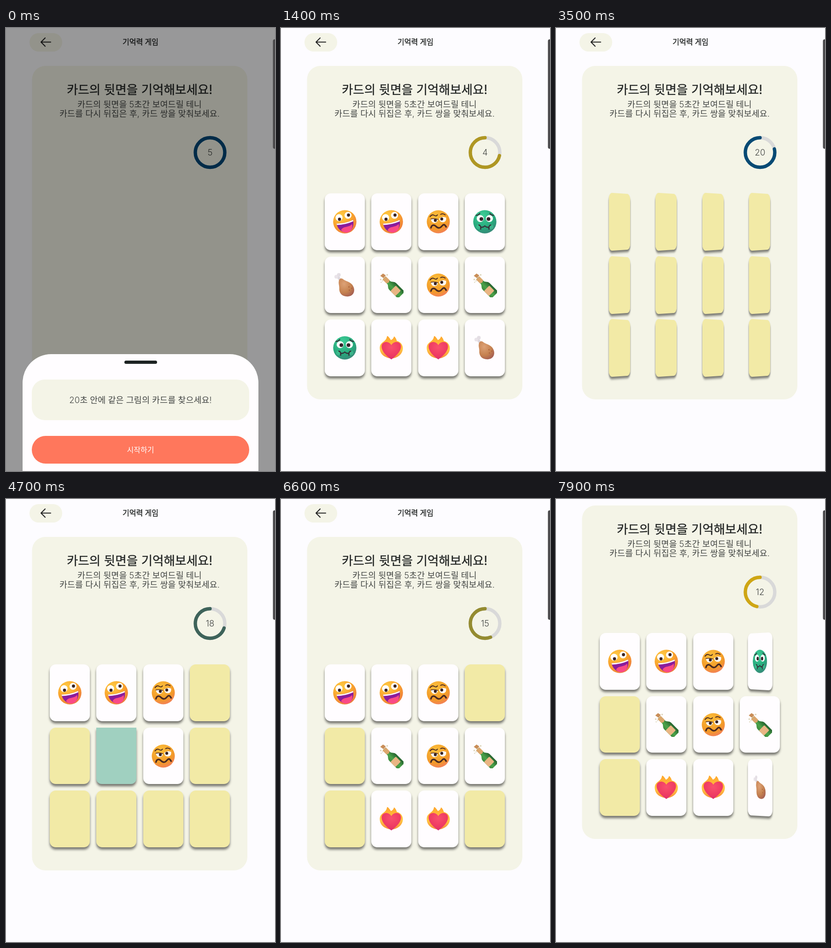
Animation of 584x959 px, one loop 8 s. Source, as an HTML page:

```html
<!DOCTYPE html>
<html lang="ko">
<head>
<meta charset="utf-8">
<title>기억력 게임</title>
<style>
html, body { margin: 0; width: 100%; height: 100%; overflow: hidden; background: #fdfcff; }
#stage { position: relative; width: 584px; height: 959px; overflow: hidden; background: #fdfcff; }
#stage svg { display: block; }
#page, .layer { position: absolute; left: 0; top: 0; width: 584px; height: 959px; }
text { font-family: Inter, "Noto Sans CJK KR", "Noto Sans CJK", sans-serif; text-anchor: middle; fill: #232625; }
.strong { stroke: #232625; stroke-width: .4px; }
.light { font-size: 18.5px; font-weight: 300; fill: #434644; }
.card { position: absolute; width: 87px; height: 122.5px; border-radius: 13px; background: #fffdff;
  box-shadow: 0 5px 5px rgba(0, 0, 0, .5); }
.card svg { position: absolute; left: 17px; top: 35px; width: 53px; height: 53px; }
.card.back { background: #f2eaa6; }
.card.back svg { visibility: hidden; }
.card.press { background: #a0d0c0; border-radius: 0 0 12px 12px; }
#dim { background: #000; }
</style>
</head>
<body>
<div id="stage">
  <div id="page">
    <svg class="layer" viewBox="0 0 584 959">
      <defs>
        <radialGradient id="gold" cx=".35" cy=".25" r=".85">
          <stop offset="0" stop-color="#ffcb45"/><stop offset=".55" stop-color="#f9a42c"/><stop offset="1" stop-color="#ec7440"/>
        </radialGradient>
        <radialGradient id="amber" cx=".4" cy=".25" r=".85">
          <stop offset="0" stop-color="#fcbf3c"/><stop offset=".65" stop-color="#f29a28"/><stop offset="1" stop-color="#f4776a"/>
        </radialGradient>
        <radialGradient id="green" cx=".4" cy=".25" r=".85">
          <stop offset="0" stop-color="#3fcf98"/><stop offset=".6" stop-color="#27a97c"/><stop offset="1" stop-color="#3c7f78"/>
        </radialGradient>
        <radialGradient id="meat" cx=".35" cy=".3" r=".8">
          <stop offset="0" stop-color="#dda277"/><stop offset=".6" stop-color="#c5814f"/><stop offset="1" stop-color="#a35c52"/>
        </radialGradient>
        <radialGradient id="rose" cx=".5" cy=".3" r=".75">
          <stop offset="0" stop-color="#f9506d"/><stop offset=".65" stop-color="#ee3a62"/><stop offset="1" stop-color="#d52a7c"/>
        </radialGradient>
        <linearGradient id="flame" x2="0" y2="1">
          <stop offset="0" stop-color="#ffa62c"/><stop offset=".6" stop-color="#ffc541"/><stop offset="1" stop-color="#f98a3a"/>
        </linearGradient>
        <linearGradient id="glass" x2="1" y2="0">
          <stop offset="0" stop-color="#3c8b3d"/><stop offset=".4" stop-color="#4ba34a"/><stop offset="1" stop-color="#24622e"/>
        </linearGradient>

        <g id="zany">
          <circle r="25.3" fill="url(#gold)"/>
          <path d="M-18 4Q1 4 18-4C21 9 15 23 3 23C-8 23-16 14-18 4Z" fill="#8a1c9c"/>
          <path d="M-18 4Q1 4 18-4L18.300-1Q1 6.500-17 7Z" fill="#fff"/>
          <path d="M-8 18C-4 9 8 13 16 5C18 15 13 23 3 23.500C-2 23.500-6 21-8 18Z" fill="#fa4a86"/>
          <circle cx="-12.500" cy="-9" r="7.600" fill="#fff"/><circle cx="7" cy="-14" r="7.600" fill="#fff"/>
          <circle cx="-11.500" cy="-5.500" r="3.400" fill="#3a2422"/><circle cx="8" cy="-14.500" r="3.400" fill="#3a2422"/>
        </g>
        <g id="woozy">
          <circle r="25" fill="url(#amber)"/>
          <path d="M-16-6Q-8-8-1-5Q-2 2-8 2.500Q-15 2-16-6Z" fill="#fff"/>
          <path d="M2-7Q9-13 17-9Q18 0 10 1Q3 1 2-7Z" fill="#fff"/>
          <circle cx="-6.500" cy="-3" r="3.200" fill="#3a2422"/><circle cx="7.500" cy="-6" r="3.200" fill="#3a2422"/>
          <g fill="none" stroke="#4a2a22" stroke-linecap="round">
            <path d="M-18-11Q-14-17-9-14T-2-15M5-16Q10-19 15-15" stroke-width="2"/>
            <path d="M-16-6Q-8-8-1-5" stroke-width="1.500"/>
            <path d="M-16 13C-14 6-9 6-5 10S3 15 8 9S15 8 17 11" stroke-width="3.400"/>
          </g>
        </g>
        <g id="sick">
          <circle r="25.200" fill="url(#green)"/>
          <circle cx="-10" cy="-7" r="7.600" fill="#fff"/><circle cx="10" cy="-7" r="7.600" fill="#fff"/>
          <circle cx="-7.500" cy="-6" r="4" fill="#33252a"/><circle cx="8" cy="-6" r="4" fill="#33252a"/>
          <ellipse cx="-14" cy="11" rx="4.500" ry="5" fill="#50d2a0" opacity=".45"/>
          <ellipse cx="14" cy="11" rx="4.500" ry="5" fill="#50d2a0" opacity=".45"/>
          <g fill="none" stroke="#363038" stroke-linecap="round">
            <path d="M-19-14Q-14-14-11-18M11-18Q14-14 19-14" stroke-width="2.200"/>
            <path d="M-13 7Q-8 8-9 16M13 7Q8 8 9 16M-9 11Q-4 13 0 9Q4 13 9 11" stroke-width="2.400"/>
          </g>
        </g>
        <g id="leg">
          <path d="M-16-19L-9-10" stroke="#ded8de" stroke-width="6" stroke-linecap="round"/>
          <circle cx="-18.500" cy="-18" r="4" fill="#e9e3e9"/><circle cx="-13" cy="-22" r="4" fill="#e4dee4"/>
          <path d="M-13-8C-13-13-8-16-4-13C2-8 10-8 16-1C24 9 21 23 8 24.500C-5 26-13 18-12 6C-12 0-14-3-13-8Z" fill="url(#meat)"/>
          <g fill="#a86139"><circle cx="9" cy="4" r="1.300"/><circle cx="15" cy="7" r="1.300"/><circle cx="10" cy="11" r="1.300"/></g>
        </g>
        <g id="fizz">
          <g transform="rotate(-45) scale(1.1)">
            <path d="M-4-20H4V-8C4-3 9.500-2 9.500 4V25Q9 28 5 28H-5Q-9 28-9.500 25V4C-9.500-2-4-3-4-8Z" fill="url(#glass)"/>
            <path d="M-4.500-20H4.500V-9L0-7L-4.500-9Z" fill="#dba66c"/>
            <rect x="-9.500" y="7" width="15" height="14" rx="1.500" fill="#e9b583"/>
          </g>
          <path d="M-24-20L-18-25L-12-21L-17-15Z" fill="#c98d58"/>
          <g fill="#ddd5bc"><circle cx="-23" cy="-12" r="1.800"/><circle cx="-19" cy="-9" r="1.300"/><circle cx="-9" cy="-22" r="1.800"/><circle cx="-22" cy="-6" r="1.200"/></g>
        </g>
        <g id="heart">
          <path d="M0 23C-17 21-26 12-25-2C-24-10-18-12-15-15C-11-18-10-22-9-26C-5-24-3-20-1-17C2-18 5-21 6-25C10-22 11-18 12-15C20-13 25-7 25 1C25 13 14 22 0 23Z" fill="url(#flame)"/>
          <path d="M0 25C-8 19-21 9-21-3C-21-15-5-16 0-6C5-16 21-15 21-3C21 9 8 19 0 25Z" fill="url(#rose)"/>
        </g>
      </defs>

      <rect x="51" y="11" width="71" height="40" rx="20" fill="#f4f4e7"/>
      <path d="M97 30.500H76M85 21.500L76 30.500L85 39.500" fill="none" stroke="#222" stroke-width="2.100" stroke-linecap="round" stroke-linejoin="round"/>
      <text class="strong" x="292" y="36" font-size="16">기억력 게임</text>
      <rect x="56.500" y="82" width="467.500" height="722" rx="29" fill="#f4f4e7"/>
      <text class="strong" x="290" y="142.500" font-size="26.600">카드의 뒷면을 기억해보세요!</text>
      <text class="light" x="290" y="172">카드의 뒷면을 5초간 보여드릴 테니</text>
      <text class="light" x="290" y="191.500">카드를 다시 뒤집은 후, 카드 쌍을 맞춰보세요.</text>
      <g transform="translate(443 269.500)" fill="none" stroke-width="7.300">
        <circle r="32" stroke="#d9d9d9"/>
        <circle id="ring" r="32" transform="rotate(-90) scale(1 -1)" stroke-linecap="round" pathLength="100"/>
      </g>
      <text id="count" class="light" x="443" y="276"></text>
    </svg>
    <div id="cards"></div>
  </div>

  <div id="dim" class="layer"></div>
  <svg class="layer" viewBox="0 0 584 959">
    <rect x="579.500" y="24.500" width="12" height="237" rx="4" fill="#4a494b"/>
    <g id="sheet">
      <path d="M36 959V768A62 62 0 0 1 98 706H486A62 62 0 0 1 548 768V959Z" fill="#fffdff"/>
      <rect x="257" y="720" width="71" height="7" rx="3.500" fill="#1d2322"/>
      <rect x="56" y="761" width="472" height="88" rx="28" fill="#f4f4e7"/>
      <text class="light" x="292" y="812">20초 안에 같은 그림의 카드를 찾으세요!</text>
      <rect x="56" y="883" width="472" height="60" rx="30" fill="#ff775c"/>
      <text x="292" y="918.500" font-size="16" style="fill:#fff">시작하기</text>
    </g>
  </svg>
</div>

<script>
const LOOP = 8000, FLIP = 240, PRESS = 100;
const SPEED = 1.84 / 1000;             // game seconds per ms
const BEGIN = 630, PLAY = BEGIN + 5 / SPEED;
const SHOW = 860, HIDE = 3353;

const deck = 'zany zany woozy sick leg fizz woozy fizz sick heart heart leg'.split(' ');
// [card, time]
const taps = [[0, 3720], [1, 3920], [2, 4180], [6, 4400], [5, 4760], [7, 4980],
  [9, 5180], [10, 5400], [3, 5640], [4, 5960], [3, 7130], [11, 7390]];
const misses = [[3, 6300], [4, 6300], [3, 7814], [11, 7814]];

const turns = deck.map((_, i) => {
  const list = [{ at: SHOW, up: true }, { at: HIDE, up: false }];
  for (const [card, at] of taps) if (card === i) list.push({ at, up: true, tap: true });
  for (const [card, at] of misses) if (card === i) list.push({ at, up: false });
  return list.sort((a, b) => a.at - b.at);
});

const $ = id => document.getElementById(id);
const clamp = x => Math.min(1, Math.max(0, x));
const ease = x => (1 - Math.cos(Math.PI * clamp(x))) / 2;
const span = (t, from, to) => ease((t - from) / (to - from));

const cards = deck.map((name, i) => {
  const el = document.createElement('div');
  el.style.left = 95.3 + (i % 4) * 101.1 + 'px';
  el.style.top = 358.3 + Math.floor(i / 4) * 136.4 + 'px';
  el.innerHTML = `<svg viewBox="-26.5 -26.5 53 53"><use href="#${name}"/></svg>`;
  $('cards').append(el);
  return el;
});

const hues = [[0, 71, 119], [247, 184, 1], [163, 0, 0]];
function hue(left, stops) {
  const k = left > stops[1] ? 0 : 1;
  const p = clamp((stops[k] - left) / (stops[k] - stops[k + 1]));
  return `rgb(${hues[k].map((v, c) => Math.round(v + (hues[k + 1][c] - v) * p))})`;
}

function drawTimer(t) {
  const playing = t >= PLAY;
  const left = playing ? 20 - (t - PLAY) * SPEED : 5 - Math.max(0, t - BEGIN) * SPEED;
  const part = left / (playing ? 25 : 5) * 100;
  $('ring').setAttribute('stroke-dasharray', part >= 100 ? 'none' : `${part} 200`);
  $('ring').setAttribute('stroke', hue(left, playing ? [20, 10, 0] : [5, 3, 1]));
  $('count').textContent = Math.ceil(left);
}

function drawCard(el, list, t) {
  let angle = 180, press = false;
  for (const { at, up, tap } of list) {
    if (tap && t >= at - PRESS && t < at) press = true;
    if (t >= at) {
      const p = span(t, at, at + FLIP);
      angle = 180 * (up ? 1 - p : p);
    }
  }
  const back = angle > 90;
  el.className = 'card' + (back ? ' back' : '') + (press ? ' press' : '');
  const turn = back ? 180 - angle : -angle;
  el.style.transform = turn ? `perspective(1500px) rotateY(${turn}deg)` : 'none';
}

function draw(t) {
  const gone = span(t, 100, 540);
  $('sheet').setAttribute('transform', `translate(0 ${260 * gone})`);
  $('dim').style.opacity = 0.4 * (1 - gone);
  $('page').style.transform = `translateY(${-68 * span(t, 6800, 7150)}px)`;
  $('cards').style.display = t < BEGIN ? 'none' : 'block';
  drawTimer(t);
  cards.forEach((el, i) => drawCard(el, turns[i], t));
}

const start = performance.now();
function tick() {
  draw((performance.now() - start) % LOOP);
  requestAnimationFrame(tick);
}
tick();
</script>
</body>
</html>
```
